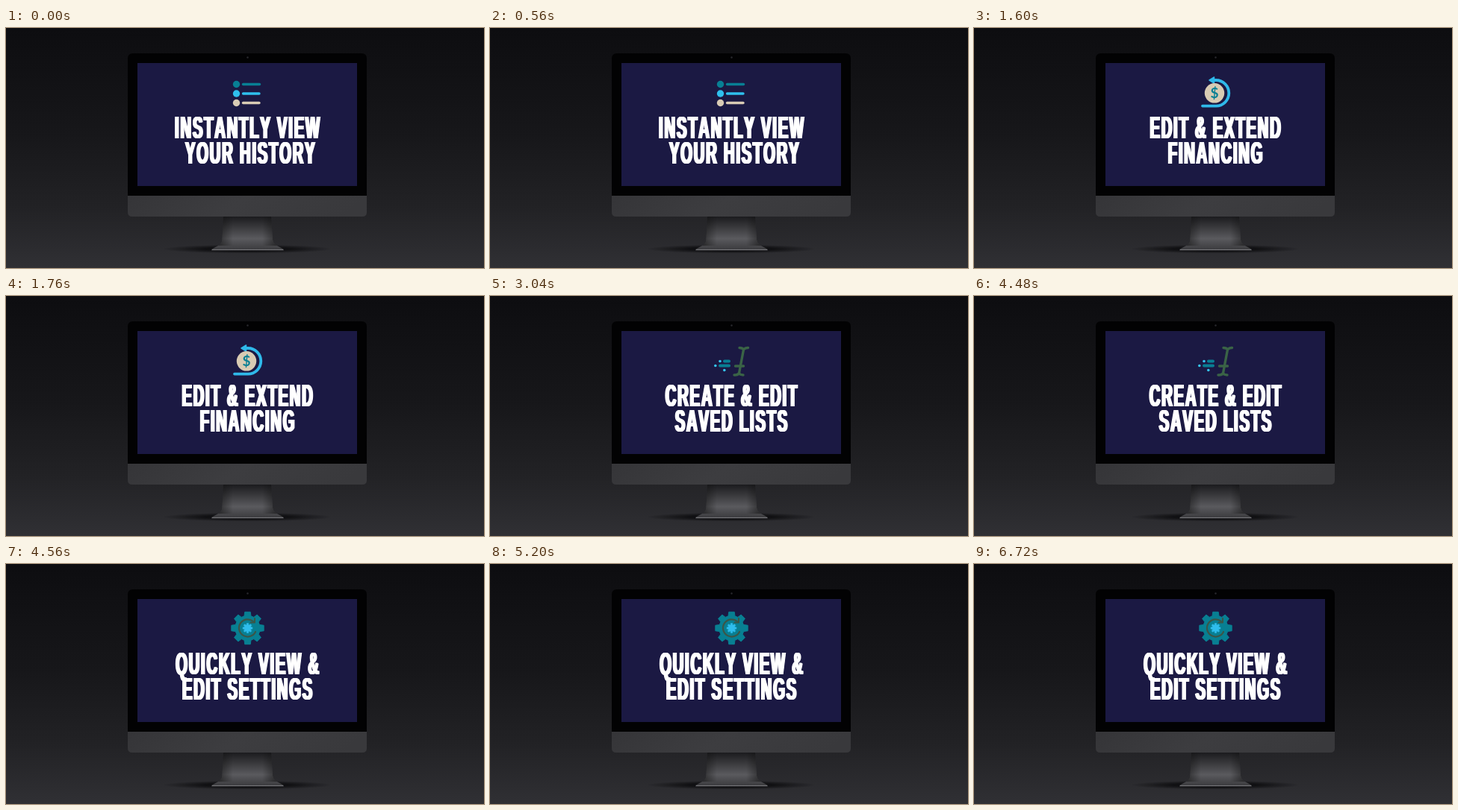
An HTML page that plays this animation: 640 by 322 pixels, repeating every 6800 ms.

```html
<!DOCTYPE html>
<html lang="en">
<head>
<meta charset="utf-8">
<title>Feature slides</title>
<style>
html, body { margin: 0; width: 100%; height: 100%; overflow: hidden; background: #18181b; }
#stage { position: relative; width: 640px; height: 322px; overflow: hidden; }
svg { position: absolute; left: 0; top: 0; }
.icon { stroke-linecap: round; stroke-linejoin: round; }
#title {
  position: absolute; left: 0; top: 115.5px; width: 648px;
  transform: scaleX(.466);
  font: bold 43.3px/34.2px "Liberation Sans", Arial, sans-serif;
  font-kerning: none; letter-spacing: 3.9px;
  text-align: center; white-space: pre; color: #fff;
  text-shadow: 2.7px 0 #fff, -2.7px 0 #fff, 1.3px 0 #fff, -1.3px 0 #fff;
}
</style>
</head>
<body>
<div id="stage">
<svg width="640" height="322" viewBox="0 0 640 322" fill="none">
  <defs>
    <linearGradient id="room" x2="0" y2="1">
      <stop stop-color="#0d0d10"/>
      <stop offset=".45" stop-color="#17171a"/>
      <stop offset=".75" stop-color="#222225"/>
      <stop offset="1" stop-color="#303034"/>
    </linearGradient>
    <linearGradient id="chin" x2="1" y2=".12">
      <stop stop-color="#353538"/>
      <stop offset=".5" stop-color="#3d3d40"/>
      <stop offset="1" stop-color="#39393c"/>
    </linearGradient>
    <linearGradient id="neck" x2="0" y2="1">
      <stop stop-color="#1b1b1e"/>
      <stop offset=".3" stop-color="#38383b"/>
      <stop offset=".65" stop-color="#5a5a5e"/>
      <stop offset="1" stop-color="#39393c"/>
    </linearGradient>
    <linearGradient id="sides">
      <stop stop-color="#111" stop-opacity=".6"/>
      <stop offset=".25" stop-color="#111" stop-opacity="0"/>
      <stop offset=".75" stop-color="#111" stop-opacity="0"/>
      <stop offset="1" stop-color="#111" stop-opacity=".6"/>
    </linearGradient>
    <radialGradient id="shadow">
      <stop stop-color="#08080a"/>
      <stop offset=".5" stop-color="#08080a" stop-opacity=".75"/>
      <stop offset="1" stop-color="#08080a" stop-opacity="0"/>
    </radialGradient>
  </defs>

  <rect width="640" height="322" fill="url(#room)"/>
  <ellipse cx="323" cy="296.5" rx="114" ry="6" fill="url(#shadow)"/>
  <path id="foot" d="M291 253H355L357 284Q358 290 363 292L372 297V298.5H275V297L284 292Q289 290 289.500 284Z" fill="url(#neck)"/>
  <path d="M291 253H355L357 284Q358 290 363 292H284Q289 290 289.500 284Z" fill="url(#sides)"/>
  <path d="M276 297.500H371" stroke="#77777b"/>

  <path d="M163 224H483V247Q483 253 477 253H169Q163 253 163 247Z" fill="url(#chin)"/>
  <path d="M163 225V41Q163 34 170 34H476Q483 34 483 41V225Z" fill="#020203"/>
  <circle cx="323.500" cy="39.500" r="1.200" fill="#29292e"/>
  <rect x="176" y="47" width="294" height="165" fill="#1b1943"/>

  <g class="icon" stroke-width="3.4">
    <g fill="#087f94" stroke="#087f94"><circle cx="308.500" cy="75.500" r="4.700" stroke="none"/><path d="M317.500 75.500H339.500"/></g>
    <g fill="#2fc0ee" stroke="#2fc0ee"><circle cx="308.500" cy="88" r="4.700" stroke="none"/><path d="M317.500 88H339"/></g>
    <g fill="#d9ccb5" stroke="#d9ccb5"><circle cx="308.500" cy="100.500" r="4.700" stroke="none"/><path d="M317.500 100.500H339"/></g>
  </g>

  <g class="icon">
    <path d="M319 70H324A17.300 17.300 0 0 1 324 104.600H306" stroke="#2fb9ea" stroke-width="3.800"/>
    <path d="M315 70L321.500 66V74Z" fill="#2fb9ea" stroke="#2fb9ea" stroke-width="1.500"/>
    <circle cx="322" cy="87.300" r="13.200" fill="#d8cbb3"/>
    <text x="322" y="94" text-anchor="middle" font-family="Lato, sans-serif" font-size="19" font-weight="700" fill="#087f94">$</text>
  </g>

  <g class="icon">
    <path d="M314 87.500H320M308 93.500H320" stroke="#087f94" stroke-width="4"/>
    <g fill="#35c5f0"><circle cx="308" cy="87.500" r="1.800"/><circle cx="301.800" cy="93.500" r="1.800"/><circle cx="313.800" cy="99.500" r="1.800"/></g>
    <path d="M334 69.500Q338 69.500 339.500 72Q342 69 345.500 69.500M339.500 72L333.500 103.500M327 106Q331.500 106.500 333.500 103.500Q335 106 339 106M328.500 94H339.500" stroke="#3a6346" stroke-width="3.400"/>
  </g>

  <g class="icon" transform="translate(323.500 86)">
    <path id="cog" fill="#087f92" stroke="#087f92"/>
    <path d="M10.500 5A11.600 11.600 0 1 1 7.500 -9" stroke="#3b5648" stroke-width="2.200"/>
    <path d="M9.500 -13V-7.500H4" stroke="#3b5648" stroke-width="2"/>
    <path id="hub" fill="#2fbdec" stroke="#2fbdec" stroke-width=".6"/>
  </g>
</svg>
<div id="title"></div>
</div>
<script>
const LOOP = 6800;
const slides = [
  { at: 0, text: "INSTANTLY VIEW\n\u00a0YOUR HISTORY" },
  { at: 1600, text: "EDIT & EXTEND\nFINANCING" },
  { at: 3040, text: "CREATE & EDIT\nSAVED LISTS" },
  { at: 4560, text: "QUICKLY VIEW &\nEDIT SETTINGS" }
];
const title = document.getElementById("title");
const icons = document.querySelectorAll(".icon");

// Eight-toothed wheel: each tooth narrows from root to tip.
function gearPath(tip, root) {
  const points = [];
  for (let tooth = 0; tooth < 8; tooth++) {
    for (const [r, turn] of [[root, -.27], [tip, -.17], [tip, .17], [root, .27]]) {
      const a = tooth * Math.PI / 4 + turn;
      points.push(`${r * Math.cos(a)} ${r * Math.sin(a)}`);
    }
  }
  return `M${points.join("L")}Z`;
}
document.getElementById("cog").setAttribute("d", gearPath(22, 16.8));
document.getElementById("hub").setAttribute("d", gearPath(6.5, 4.7));

const start = performance.now();
let shown = -1;

function draw() {
  const t = (performance.now() - start) % LOOP;
  const current = slides.findLastIndex(slide => t >= slide.at);
  if (current !== shown) {
    shown = current;
    title.textContent = slides[current].text;
    icons.forEach((icon, i) => icon.style.display = i === current ? "" : "none");
  }
  requestAnimationFrame(draw);
}
draw();
</script>
</body>
</html>
```
